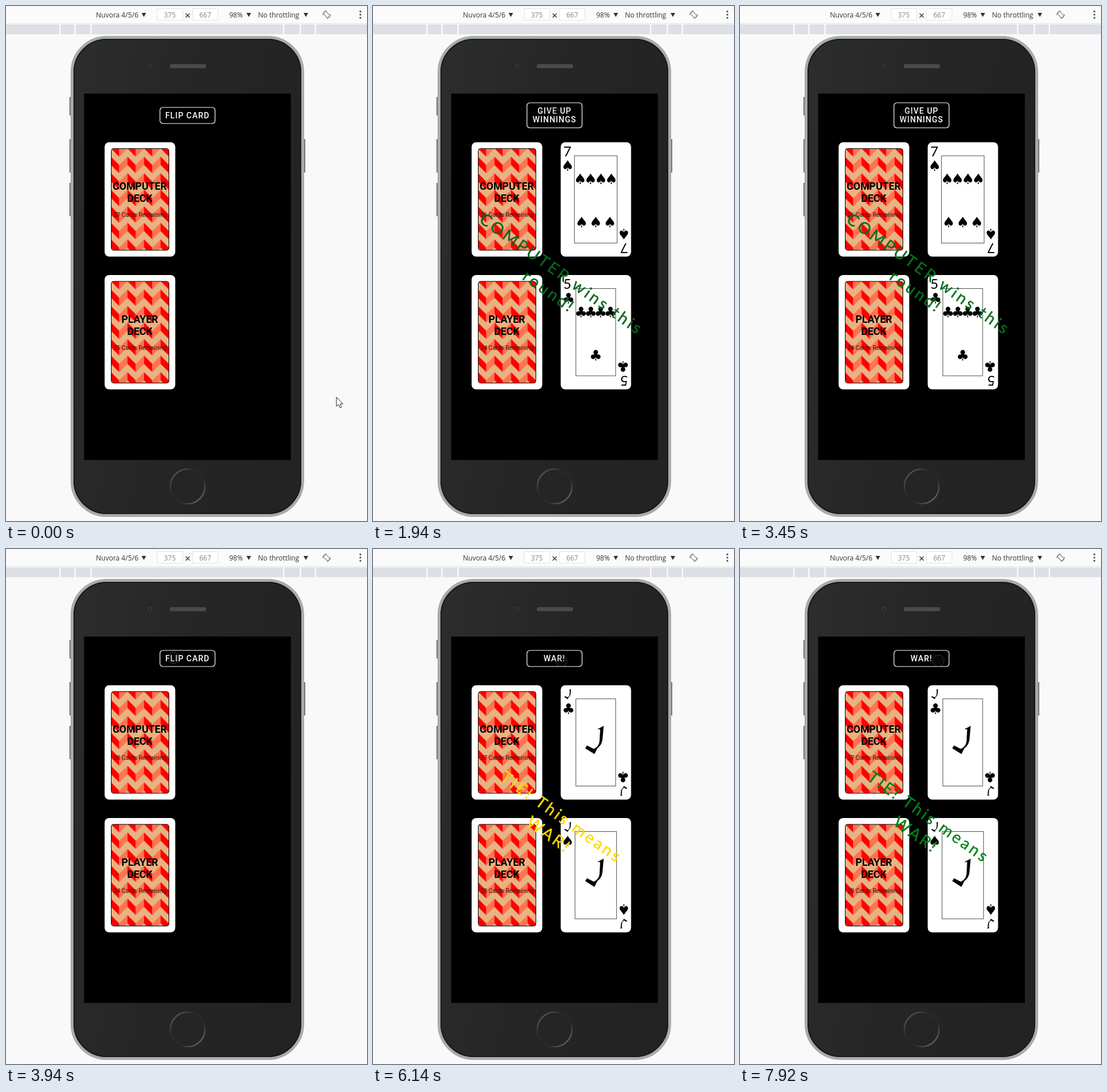
An HTML page for the animation above (7.99 s loop, 626 by 894 pixels).

```html
<!DOCTYPE html>
<html lang="en">
<head>
<meta charset="utf-8">
<title>Card duel</title>
<style>
  html, body { margin: 0; width: 100%; height: 100%; overflow: hidden; background: #f9f9f9; }
  svg { display: block; width: 626px; height: 894px; }
  text { font-family: Roboto, sans-serif; }
  .mid { text-anchor: middle; }
  .bar text { font: 12px "Open Sans", sans-serif; fill: #333; }
  .bar .dim { fill: #858585; }
  .deck { font-size: 17.6px; font-weight: 700; }
  .count { font-size: 10.3px; fill: #241a14; }
  .button { font-size: 14px; font-weight: 500; letter-spacing: 1px; fill: #fff; }
  .rank { font: 24px Lato, sans-serif; }
  .suit { font: 25px "DejaVu Sans", sans-serif; }
  .result text { font: 28px Lato, sans-serif; letter-spacing: 4px; }
</style>
</head>
<body>
<svg id="stage" viewBox="0 0 626 894">
  <defs>
    <linearGradient id="body" x2="1" y2="0.3">
      <stop offset="0" stop-color="#2c2d2d"/><stop offset=".5" stop-color="#262626"/><stop offset="1" stop-color="#232323"/>
    </linearGradient>
    <linearGradient id="ring" x2="1" y2="1">
      <stop offset="0" stop-color="#706a66"/><stop offset=".35" stop-color="#2b2a2a"/>
      <stop offset=".65" stop-color="#2b2a2a"/><stop offset="1" stop-color="#8a7d74"/>
    </linearGradient>
    <pattern id="zigzag" x="182" y="247" width="28.7" height="28.7" patternUnits="userSpaceOnUse">
      <rect width="29" height="29" fill="#e8b383"/>
      <g id="chevron">
        <path d="M0 14.7l14.35 14.35v14.35L0 29.05z" fill="#f00"/>
        <path d="M14.35 29.05L28.7 14.7v14.35L14.35 43.4z" fill="#ff7350"/>
      </g>
      <use href="#chevron" y="-28.7"/>
    </pattern>
    <path id="jack" d="M4-19L15-25 13-2C12 6 9 10 4 14L-1 24-17 14-14 9-2 15C6 11 8 5 8-2L9-19z"/>
  </defs>

  <rect width="626" height="894" fill="#f9f9f9"/>
  <g class="bar">
    <rect width="626" height="31" fill="#fbfbfb"/>
    <path d="M0 30.5H626" stroke="#e3e3e3"/>
    <rect y="32" width="626" height="17" fill="#dce0e5"/>
    <path d="M93.5 32v17M119.5 32v17M147.5 32v17M481.5 32v17M510.5 32v17M536.5 32v17" stroke="#fff" stroke-width="2"/>
    <text x="156" y="20">Nuvora 4/5/6</text>
    <text x="387" y="20">98%</text>
    <text x="437" y="20">No throttling</text>
    <path d="M235 12h8l-4 7zM417 12h8l-4 7zM516 12h8l-4 7z" fill="#333"/>
    <path d="M262.5 4.5h44v20h-44zM323.5 4.5h44v20h-44z" fill="#fff" stroke="#e4e4e4"/>
    <text class="mid dim" x="284" y="20">375</text>
    <text class="mid dim" x="345.5" y="20">667</text>
    <path d="M311.5 13l7 7m0-7l-7 7" stroke="#333" stroke-width="1.3"/>
    <g fill="none" stroke="#777">
      <rect x="553" y="9.5" width="6" height="11" rx="1" transform="rotate(-45 556 15)"/>
      <path d="M549.5 16a6.500 6.500 0 0 1 6.500-7.500M562.500 14a6.500 6.500 0 0 1-6.500 7.500"/>
    </g>
    <path d="M613 8h3v3h-3zM613 13.5h3v3h-3zM613 19h3v3h-3z" fill="#666"/>
  </g>

  <path d="M110 158h4v32h-4zM110 231h4v58h-4zM110 307h4v58h-4zM516 231h3v58h-3z" fill="#777"/>
  <rect x="114.5" y="54.5" width="400" height="830" rx="60" fill="url(#body)" stroke="#a9aaaa" stroke-width="5"/>
  <rect x="118" y="58" width="393" height="823" rx="57" fill="none" stroke="#1a1a1a" stroke-width="2"/>
  <circle cx="250" cy="104" r="2.5" fill="#151515" stroke="#555"/>
  <rect x="284" y="101" width="63" height="7" rx="3" fill="#4c4a49"/>
  <circle cx="315" cy="834" r="30" fill="none" stroke="url(#ring)" stroke-width="2.5"/>
  <rect x="135.5" y="152" width="358.5" height="636"/>

  <rect id="frame" x="267" width="95.5" rx="5" fill="none" stroke="#fff" stroke-width="1.2"/>
  <g id="label" class="button mid"></g>
  <g id="decks"></g>
  <g id="faces"></g>
  <g id="result" class="result mid" stroke-width=".4" transform="translate(315 479) rotate(35.5)"></g>

  <circle id="touch" r="10" fill="#323232" fill-opacity=".35" stroke="#777"/>
  <path id="arrow" d="M0 0v16l3.7-3.3 2.5 5.8 2.6-1.1-2.5-5.6h5z" fill="#fff" stroke="#222"/>
</svg>
<script>
const LOOP = 7990, CARD_GAP = 230.5;
const el = id => document.getElementById(id);
const text = (x, y, s, cls = '') => `<text class="${cls}" x="${x}" y="${y}">${s}</text>`;
const lower = (row, s) => `<g transform="translate(0 ${row * CARD_GAP})">${s}</g>`;

const scenes = [
  { start: 0, label: ['FLIP CARD'], left: [27, 25] },
  { start: 1740, label: ['GIVE UP', 'WINNINGS'], left: [26, 24], cards: ['7♠', '5♣'], result: ['COMPUTER wins this', 'round!'] },
  { start: 3940, label: ['FLIP CARD'], left: [28, 24] },
  { start: 5460, label: ['WAR!'], left: [27, 23], cards: ['J♣', 'J♠'], result: ['TIE! This means', 'WAR!'] }
];
const presses = [[1330, 1440], [3640, 3720], [5130, 5190]];

// Keyframes: time followed by values
const cursorPath = [
  [70, 573, 679], [360, 425, 410], [610, 267, 153], [810, 333, 172], [1070, 322, 183],
  [1800, 322, 183], [2300, 290, 189], [5750, 290, 189], [6200, 332, 195], [6400, 344, 194]
];
const resultColors = [[0, 14, 82, 36], [460, 0, 130, 25], [650, 255, 221, 0], [870, 255, 190, 0], [1000, 255, 165, 0]];

function sample(keys, t) {
  const i = keys.findIndex(k => k[0] > t);
  if (i === 0) return keys[0].slice(1);
  if (i < 0) return keys.at(-1).slice(1);
  const a = keys[i - 1], b = keys[i], p = (t - a[0]) / (b[0] - a[0]);
  return a.slice(1).map((v, n) => v + (b[n + 1] - v) * p);
}

function deck(row, name, count) {
  return lower(row, `
    <rect x="171" y="236.5" width="122.5" height="198.5" rx="8" fill="#fff"/>
    <rect x="182.5" y="247.5" width="100" height="176.5" rx="4" fill="url(#zigzag)" stroke="#000"/>
    ${text(232, 319, name, 'deck mid')}${text(232, 340, 'DECK', 'deck mid')}
    ${text(232.5, 366, count + ' Cards Remaining', 'count mid')}`);
}

function face(row, [rank, suit]) {
  const spade = suit === '♠', jack = rank === 'J';
  const half = spade ? (jack ? 36 : 37) : 34.5;
  const pip = (x, y) => text(x, y + 9, suit, 'suit mid');
  const corner = (jack ? '<use href="#jack" transform="translate(338 252) scale(.36)"/>' : text(337, 260.5, rank, 'rank mid'))
    + pip(spade ? 337.5 : 339, 276.5);
  const pips = (n, y, gap) => Array.from({ length: n }, (_, i) => pip(386.3 + (i - (n - 1) / 2) * gap, y)).join('');
  const middle = jack ? '<use href="#jack" x="385" y="332"/>'
    : pips(4, 300, spade ? 18 : 17) + pips(rank - 4, 375, 24.5);
  return lower(row, `
    <rect x="325.5" y="236.5" width="122" height="198.5" rx="8" fill="#fff"/>
    <rect x="${386.3 - half}" y="260" width="${half * 2}" height="151.5" fill="none" stroke="#4a524a"/>
    ${corner}<g transform="rotate(180 386.3 336)">${corner}</g>${middle}`);
}

function showScene({ label, left, cards = [], result = [] }) {
  const tall = label.length > 1;
  el('frame').setAttribute('y', tall ? 168 : 176);
  el('frame').setAttribute('height', tall ? 43.5 : 28);
  el('label').innerHTML = label.map((s, i) => text(314.7, (tall ? 187 : 195) + i * 14.5, s)).join('');
  el('decks').innerHTML = deck(0, 'COMPUTER', left[0]) + deck(1, 'PLAYER', left[1]);
  el('faces').innerHTML = cards.map((card, row) => face(row, card)).join('');
  el('result').innerHTML = result.map((s, i) => text(2, -8.5 + i * 37.5, s)).join('');
}

let current;
function draw(now) {
  const t = now % LOOP;
  const scene = scenes.findLast(s => s.start <= t);
  if (scene !== current) showScene(current = scene);

  const phase = (t - scene.start) % 2000;
  const color = `rgb(${sample(resultColors, Math.min(phase, 2000 - phase)).map(Math.round)})`;
  el('result').setAttribute('fill', color);
  el('result').setAttribute('stroke', color);

  const [x, y] = sample(cursorPath, t);
  const onScreen = x < 494;
  const pressed = presses.some(([from, to]) => t >= from && t < to);
  el('touch').setAttribute('transform', `translate(${x} ${y})`);
  el('touch').setAttribute('opacity', onScreen ? (pressed ? 0.75 : 0.45) : 0);
  el('arrow').setAttribute('transform', `translate(${x} ${y})`);
  el('arrow').setAttribute('opacity', onScreen ? 0 : 1);
}

const origin = performance.now();
function tick() {
  draw(performance.now() - origin);
  requestAnimationFrame(tick);
}
tick();
</script>
</body>
</html>
```
